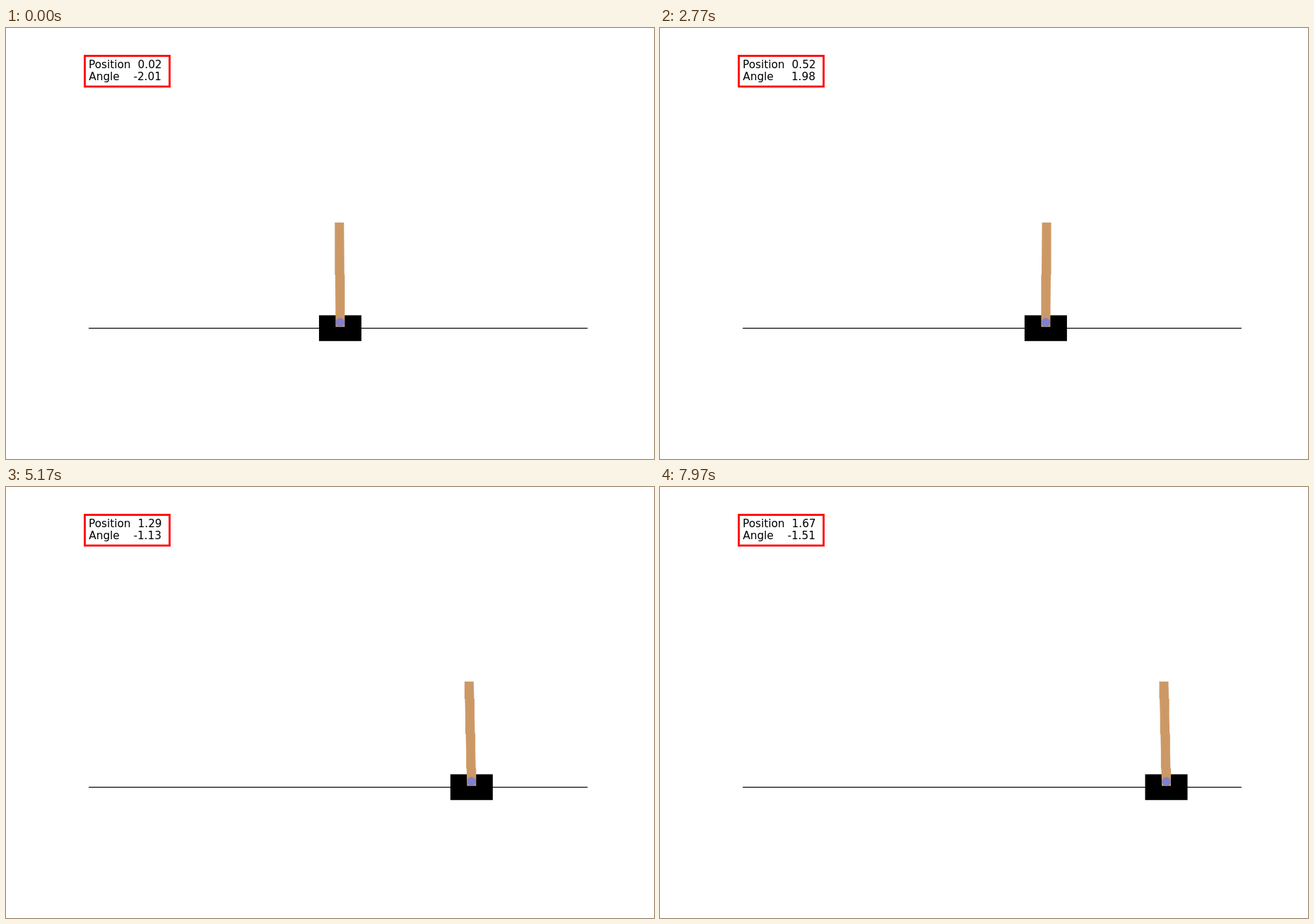
Animation of 917x611 px, one loop 8 s. Source, as an HTML page:

```html
<!DOCTYPE html>
<html lang="en">
<head>
<meta charset="utf-8">
<title>Cart pole</title>
<style>
  html, body { margin: 0; width: 100%; height: 100%; overflow: hidden; background: #fff; }
  svg { display: block; width: 100vw; height: 100vh; }
  text { font: 15.28px "DejaVu Sans", sans-serif; white-space: pre; }
</style>
</head>
<body>
<svg viewBox="0 0 917 611">
  <rect x="111.5" y="39.5" width="120" height="43.5" fill="#fff" stroke="#f00" stroke-width="2.8"/>
  <text x="117" y="57">Position</text>
  <text id="pos" x="186.6" y="57"></text>
  <text x="117.3" y="74">Angle</text>
  <text id="ang" x="219.9" y="74" text-anchor="end"></text>
  <rect x="117" y="425" width="706" height="1.2"/>
  <g id="cart">
    <rect y="407.3" width="60" height="36.5"/>
    <path id="pole" fill="#cc9966"/>
    <circle cx="30" cy="417.4" r="6.3" fill="#8080cc"/>
  </g>
</svg>
<script>
const LOOP = 8, FPS = 30;      // seconds, frames per second
const PX = 706 / 600;          // size of one simulation pixel
const LEFT = 117, TOP = 275.7, BOTTOM = 423.8;
const [pos, ang, cart, pole] = ['pos', 'ang', 'cart', 'pole'].map(id => document.getElementById(id));

// Poses the cart passes through; offset and lean are in simulation pixels
const POSES = [
  { at: 0,    offset: 2.5,   lean: -1, angle: -2.01 },
  { at: 1.73, offset: 25.2,  lean: 4,  angle: -1.94 },
  { at: 2.77, offset: 64.6,  lean: 1,  angle: 1.99 },
  { at: 3.73, offset: 104.7, lean: 0,  angle: 2 },
  { at: 5.17, offset: 160.8, lean: -3, angle: -1.14 },
  { at: 6.87, offset: 200.2, lean: -3, angle: -0.27 },
  { at: 7.97, offset: 209.1, lean: -3, angle: -1.51 },
];

const lerp = (a, b, s) => a + (b - a) * s;

// Slope at pose i of the parabola through it and its two neighbours
function tangent(key, i) {
  const mid = Math.min(Math.max(i, 1), POSES.length - 2);
  const [a, b, c] = POSES.slice(mid - 1, mid + 2);
  const rise = (p, q) => (q[key] - p[key]) / (q.at - p.at);
  const bend = (rise(b, c) - rise(a, b)) / (c.at - a.at);
  return rise(a, b) + bend * (2 * POSES[i].at - a.at - b.at);
}

function spline(key, i, s) {
  const a = POSES[i], b = POSES[i + 1], r = 1 - s;
  return lerp(a[key], b[key], s * s * (3 - 2 * s))
    + (b.at - a.at) * s * r * (tangent(key, i) * r - tangent(key, i + 1) * s);
}

// Leaning bar with soft sides, over a stack of upright blocks one pixel apart
function polePath(lean) {
  const n = Math.abs(lean), dir = Math.sign(lean), width = 11 * PX, x = 20 * PX;
  const bar = (x0, y0, x1, y1) => `M${x0} ${y0}h${width}L${x1 + width} ${y1}h${-width}z`;
  const level = f => lerp(BOTTOM, TOP, Math.min(1, Math.max(0, f)));
  let d = bar(x, BOTTOM, x + lean * PX, TOP);
  for (let k = 0; k <= n && n; k++) {
    const bx = x + dir * k * PX;
    d += bar(bx, level((k - 0.5) / n), bx, level((k + 0.5) / n));
  }
  return d;
}

function draw(time) {
  const step = Math.floor((time % LOOP) * FPS + 0.1);
  const t = step < 2 ? 0 : Math.min(step / FPS, POSES.at(-1).at);
  let i = 0;
  while (i < POSES.length - 2 && t >= POSES[i + 1].at) i++;
  const a = POSES[i], b = POSES[i + 1], s = (t - a.at) / (b.at - a.at);

  const offset = spline('offset', i, s);
  cart.setAttribute('transform', `translate(${LEFT + PX * (275 + Math.floor(offset))} 0)`);
  pole.setAttribute('d', polePath(Math.round(spline('lean', i, s))));
  pos.textContent = (offset / 125).toFixed(2);
  ang.textContent = lerp(a.angle, b.angle, s).toFixed(2);
}

const start = performance.now();
function tick() {
  draw((performance.now() - start) / 1000);
  requestAnimationFrame(tick);
}
tick();
</script>
</body>
</html>
```
